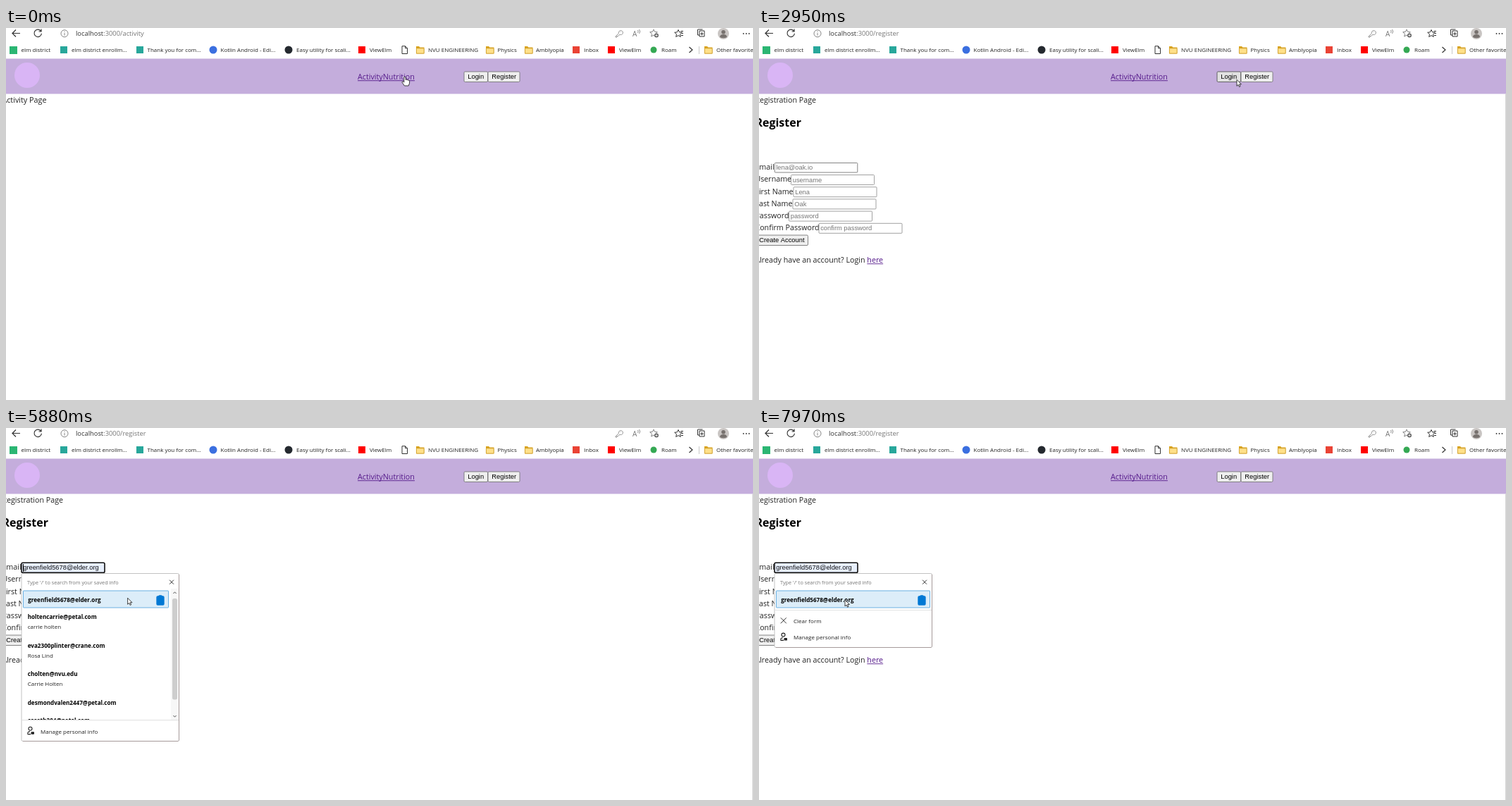
Write an HTML page with a canvas that moves like this. It is 1060 px wide and 528 px high and loops after 8 s.

```html
<!DOCTYPE html>
<html lang="en">
<head>
<meta charset="utf-8">
<title>Page navigation</title>
<style>
html, body { margin: 0; width: 100%; height: 100%; overflow: hidden; background: #fff; }
canvas { display: block; width: 1060px; height: 528px; }
</style>
</head>
<body>
<canvas id="stage" width="1060" height="528"></canvas>
<script>
const c = document.getElementById('stage').getContext('2d');
const LOOP = 8000, LEFT = -5.6;
const UI = '"Open Sans", "Noto Sans", sans-serif';
const FORM = '"Liberation Sans", sans-serif';
const PURPLE = '#551a8b';
const EMAIL = 'greenfield5678@elder.org';

// ---- drawing helpers ----
function text(s, x, y, size, color = '#222', font = UI, weight = 400) {
  c.font = `${weight} ${size}px ${font}`;
  c.fillStyle = color;
  c.fillText(s, x, y);
  return c.measureText(s).width;
}
function rect(x, y, w, h, color) {
  c.fillStyle = color;
  c.fillRect(x, y, w, h);
}
function box(x, y, w, h, r, fill, stroke, width = 1) {
  c.beginPath();
  c.roundRect(x, y, w, h, r);
  if (fill) { c.fillStyle = fill; c.fill(); }
  if (stroke) { c.strokeStyle = stroke; c.lineWidth = width; c.stroke(); }
}
function disc(x, y, r, color) {
  c.beginPath();
  c.arc(x, y, r, 0, 7);
  c.fillStyle = color;
  c.fill();
}
function line(d, color = '#333', width = 1) {
  c.strokeStyle = color;
  c.lineWidth = width;
  c.stroke(new Path2D(d));
}
function shape(d, color) {
  c.fillStyle = color;
  c.fill(new Path2D(d));
}
function link(s, x, y) {
  const w = text(s, x, y, 10.75, PURPLE);
  rect(x, y + 1.3, w, 0.9, PURPLE);
}
function button(s, x, y, w, h, hover) {
  box(x + .5, y + .5, w - 1, h - 1, 1.5, hover ? '#e2e2e2' : '#efefef', hover ? '#555' : '#767676', .9);
  text(s, x + 5.8, y + 10.4, 9.33, '#000', FORM);
}

// ---- browser frame ----
function folder(x) {
  shape(`M${x} 26h4l1.5 1.6h6v9h-11.5z`, '#d9a21b');
  box(x + .4, 28.8, 10.7, 7.2, .8, '#ffe08a', '#c9982a', .7);
}
function toolbar(path) {
  line('M20 7.5H9M14 2.5L9 7.5L14 12.5', '#333', 1.2);
  line('M49.3 4.2A5.2 5.2 0 1 0 50.4 7.8M50 1.5V5H46.5', '#333', 1.2);
  line('M88 7.8A5 5 0 1 1 78 7.8A5 5 0 1 1 88 7.8M83 7V10.6M83 4.7V5.8', '#777', .9);
  const w = text('localhost', 99, 11, 9.35, '#333');
  text(':3000' + path, 99 + w, 11, 9.35, '#767676');

  line('M869.5 7.5L865 12V13H867V11.5H868.5L871 9.3A3 3 0 1 0 869.5 7.5M872 5.5V6', '#888', .9);
  text('A', 889, 12, 10, '#777');
  line('M896.5 3Q898 5 896.5 7M898.5 2Q901 5 898.5 8', '#777', .8);
  const star = 'l1.6 3.4 3.7.4-2.8 2.5.8 3.7-3.3-1.9-3.3 1.9.8-3.7-2.8-2.5 3.7-.4z';
  line('M919 2' + star, '#777', .9);
  disc(923, 10.5, 3, '#666');
  line('M921.3 10.5h3.4M923 8.8v3.4', '#fff', .8);
  line('M954 2.5' + star + 'M957.5 4.5h3.5M958.5 7.5h2.5M958 10.5h3', '#333', 1);
  line('M984 4h7v8h-7zM982 2h6.5M981.5 2v8h2.5M987.5 6v4.4M985.3 8.2h4.4', '#333', 1);
  disc(1018, 8, 8, '#c9c5c3');
  disc(1018, 5.7, 2.8, '#77716e');
  shape('M1013 13Q1013 9 1018 9T1023 13Q1018 15.5 1013 13Z', '#77716e');
  [1046.5, 1050.5, 1054.5].forEach(x => disc(x, 8, .9, '#333'));
}
function bookmarks() {
  rect(5, 26, 11, 11, '#2bb673');
  rect(77, 26, 10, 10, '#28a79b');
  rect(185, 26, 10, 10, '#28a79b');
  disc(294, 31, 5.5, '#3b6fe0');
  disc(401, 31, 5.5, '#24292f');
  rect(500, 26, 10, 10, '#f00');
  line('M562 25.7h4.5l3 3V36.5H562zM566.5 25.7v3h3', '#333', 1);
  [582, 681, 736, 991].forEach(folder);
  rect(804, 26, 10, 10, '#ea4335');
  rect(854, 26, 10, 10, '#f00');
  disc(919, 31, 4.5, '#34a853');
  const labels = [
    ['elm district', 21.5], ['elm district enrollm...', 93], ['Thank you for com...', 200.5],
    ['Kotlin Android - Edi...', 304.5], ['Easy utility for scali...', 412], ['ViewElm', 516],
    ['NVU ENGINEERING', 599], ['Physics', 697.5], ['Amblyopia', 752], ['Inbox', 820],
    ['ViewElm', 870], ['Roam', 930], ['Other favorite', 1008]
  ];
  for (const [s, x] of labels) text(s, x, 34, 8);
  line('M969.5 27L974 31L969.5 35', '#333', 1.2);
  line('M983.5 26V37', '#c8c8c8', 1);
}
function navbar(cur) {
  rect(0, 43.5, 1060, 50, '#c4addc');
  disc(30, 67, 18, '#d9b5f5');
  link('ActivityNutrition', 499, 73);
  const hover = (a, b) => inside(cur, a, b, 62, 77);
  button('Login', 649.5, 61.5, 34.5, 15.5, hover(650, 683));
  button('Register', 683.5, 61.5, 46, 15.5, hover(684, 729));
}

// ---- pages ----
function band() {
  const pale = '#e6f2f7', aqua = '#cbe8ee', grey = '#cbcbcb';
  shape('M205 140Q226 134 239 153Q263 186 261 244L265 264Q230 268 197 257Q203 225 198 205L200 178L209 165Z', pale);
  shape('M211 152Q230 146 243 167Q259 198 257 240Q228 246 206 214Q200 184 211 152Z', aqua);
  shape('M200 248Q235 259 264 246L262 280L192 268Z', pale);
  shape('M196 290L257 304Q249 338 220 366L210 362Q231 335 236 316Q216 304 196 290Z', pale);
  shape('M240 305L257 304Q249 338 222 364Q238 335 240 305Z', aqua);
  shape('M187 264L264 279L259 304L180 286Z', pale);
  shape('M183 275L262 292L259 304L180 286Z', aqua);
  shape('M62 262L133 289Q118 312 125 345Q131 386 158 400Q178 409 201 396L186 409Q158 412 129 405Q92 394 72 350Q51 310 62 262Z', pale);
  shape('M65 278Q95 280 121 298Q116 330 124 358Q132 390 156 404Q134 405 116 397Q90 385 76 352Q57 312 65 278Z', aqua);
  shape('M92 361L109 367L111 371L95 367ZM97 375L117 381L120 386L102 382Z', pale);
  shape('M152 344L214 360L210 373L147 360Z', pale);
  shape('M151 342L158 347L149 364L137 376L146 354ZM170 344L194 349L191 358L167 353ZM168 361L189 365L183 378L165 373Z', grey);
  shape('M209 362L220 362Q221 381 208 392L187 410L180 407Q204 394 209 362Z', grey);
  line('M153 383L168 386', '#ddd', 1);
  shape('M148 132Q169 130 203 142Q210 150 208 165Q168 220 133 288L63 263Q88 201 132 147Q140 136 148 132Z', grey);
  line('M147 127L201 142', '#c4c4c4', .8);
  line('M203 151Q165 207 136 275', '#dedede', 1);
}
function home() {
  band();
  text('Zest Journal', LEFT, 481, 21.3, '#000', UI, 700);
  text('Helping you take back control of your world', LEFT, 519, 16, '#000', UI, 700);
}
function field(x, y, hint) {
  box(x, y, 118, 14, 1, '#fff', '#8a8a8a', .8);
  text(hint, x + 2.2, y + 10, 9.33, '#757575', FORM);
}
function register(t) {
  text('Registration Page', LEFT, 106, 10.7);
  text('Register', LEFT, 140, 16, '#000', UI, 700);
  const rows = [['Email'], ['Username', 45.5, 'username'], ['First Name', 49, 'Lena'],
    ['Last Name', 48, 'Oak'], ['Password', 42.5, 'password'], ['Confirm Password', 85, 'confirm password']];
  rows.forEach(([label, x, hint], i) => {
    text(label, LEFT, 201.2 + i * 17.2, 10.7);
    if (hint) field(x, 191.3 + i * 17.2, hint);
  });
  button('Create Account', LEFT, 293.5, 75.6, 15.5);
  const s = 'Already have an account? Login ';
  link('here', LEFT + text(s, LEFT, 333, 10.7), 333);

  const filled = t >= 4350, focused = t >= 3750;
  const fill = filled ? '#e8f0fe' : '#fff';
  if (focused) box(22, 191.3, 118, 14, 1.8, fill, '#101010', 1.6);
  else box(22.3, 191.5, 117.5, 13.5, 1, fill, '#767676', .9);
  const w = text(filled ? EMAIL : 'lena@oak.io', 24.2, 201, 9.33, filled ? '#111' : '#757575', FORM);
  if (caretOn(t)) rect(t < 6430 ? 24 : 24.4 + w, 193, 1, 11, '#000');
}
function caretOn(t) {
  if (t < 3750) return false;
  if (t < 6430) return Math.floor((t - 3750) / 530) % 2 === 0;
  return t < 7000 || (t >= 7440 && t < 7900);
}

// ---- saved info popup ----
function cross(x, y, r) {
  line(`M${x - r} ${y - r}L${x + r} ${y + r}M${x + r} ${y - r}L${x - r} ${y + r}`, '#333', 1);
}
function clipboard(x, on) {
  const color = on ? '#0078d4' : '#222';
  box(x - 5, 239, 10, 12, 1.2, on ? color : '#fff', color, 1.3);
  box(x - 2.5, 237.8, 5, 2.4, 1, on ? color : '#fff', color, 1);
}
function manage(y) {
  c.beginPath();
  c.arc(34.5, y - 6.8, 2.5, 0, 7);
  c.strokeStyle = '#222';
  c.lineWidth = 1.1;
  c.stroke();
  line(`M35 ${y + 1}H31Q30 ${y - 2.7} 34 ${y - 2.7}`, '#222', 1.1);
  box(35.5, y - 2.3, 4.5, 3.4, .6, '#222');
  text('Manage personal info', 49, y, 8);
}
function popup(short, hover, alpha) {
  const h = short ? 105 : 238, bold = (s, x, y) => text(s, x, y, 8.15, '#000', UI, 700);
  c.save();
  c.globalAlpha = alpha;
  if (alpha < 1) {
    c.translate(134, 206.5 + h / 2);
    c.scale(.991, .991);
    c.translate(-134, -206.5 - h / 2);
  }
  box(22, 206.5, 223.5, h, 2, '#fff', '#bcbcbc', .9);
  line(`M245.5 208V${205.5 + h}M24 ${206.5 + h}H244.5`, '#a39696', .9);
  text("Type '/' to search from your saved info", 30, 221.5, 7.3, '#767676');
  cross(235, 218.7, 3);
  if (hover) box(24.5, 231, short ? 218 : 206, 24, .5, '#dcedf9', '#6ab0e2', 1);
  clipboard(short ? 231 : 219, hover);
  bold(EMAIL, 31.2, 247.2);
  if (short) {
    line('M22 258.5H245', '#e2e2e2', 1);
    cross(34.8, 273.3, 4);
    text('Clear form', 49, 276.7, 8);
    manage(300.4);
  } else {
    rect(234, 228, 11, 186, '#f7f7f7');
    box(236, 242, 7, 143.5, 2.5, '#cdcdcd');
    line('M237.4 235L239.5 232.8L241.6 235M237.4 408L239.5 410.2L241.6 408', '#555', 1);
    bold('holtencarrie@petal.com', 30.7, 271.3);
    text('carrie holten', 30.7, 285.3, 8);
    bold('eva2300plinter@crane.com', 30.7, 311.8);
    text('Rosa Lind', 30.7, 325.7, 8);
    bold('cholten@nvu.edu', 30.7, 352.4);
    text('Carrie Holten', 30.7, 366.4, 8);
    bold('desmondvalen2447@petal.com', 30.7, 392.6);
    c.save();
    c.beginPath();
    c.rect(23, 400, 210, 14.3);
    c.clip();
    bold('caseth204@petal.com', 30.7, 418.4);
    c.restore();
    line('M22 414.7H245', '#dedede', 1);
    manage(433.6);
  }
  c.restore();
}

// ---- pointer ----
// start, end, steps, target x, target y, lift, lead (0: the first step is the click)
const moves = [
  [250, 1210, 8, 30, 62, 0, 0],
  [1640, 2420, 7, 714, 66, -6, 1],
  [2700, 3600, 8, 64, 199, 0, 0],
  [4050, 4350, 3, 161, 234, 0, 1],
  [5340, 5470, 2, 177, 242, 0, 1],
  [5750, 6430, 6, 118, 232, 0, 1],
  [6720, 6720, 1, 112, 203, 0, 1],
  [6870, 7140, 3, 97, 200, 0, 1],
  [7440, 7970, 5, 122, 244, 0, 0]
];
function pointer(t) {
  let x = 566, y = 69;
  for (const [t0, t1, n, tx, ty, lift, lead] of moves) {
    if (t < t0) break;
    const i = n > 1 ? Math.min(n - 1, Math.floor((t - t0) / (t1 - t0) * (n - 1) + 1e-6)) : 0;
    const p = (i + lead) / (n - 1 + lead), e = p * p * (3 - 2 * p);
    x += (tx - x) * e;
    y += (ty - y) * e + lift * Math.sin(Math.PI * p);
  }
  return { x, y };
}
function inside(p, x0, x1, y0, y1) {
  return p.x >= x0 && p.x <= x1 && p.y >= y0 && p.y <= y1;
}
function drawPointer(p, onForm) {
  c.save();
  c.translate(p.x, p.y);
  c.lineJoin = 'round';
  let d = 'M0 0V9L2.1 7.1L3.5 10.2L5 9.5L3.6 6.5H6.4Z';
  if (inside(p, 499, 580, 62, 77) || inside(p, 8, 51, 50, 84))
    d = 'M-1.2 .8Q0-.8 1.1 .8V4.4Q2.4 3.6 3.2 4.8Q4.4 4.2 5.1 5.4Q6.4 5 6.6 6.4V9.2L5.2 13H-.6L-3.9 8.2Q-4 6.3-2.3 7L-1.2 8.1Z';
  else if (onForm && inside(p, 22, 140, 191, 206)) d = '';
  if (d) {
    shape(d, '#fff');
    line(d, '#111', .8);
  } else {
    line('M-2-5Q0-5 0-4Q0-5 2-5M0-4V4M-2 5Q0 5 0 4Q0 5 2 5', '#111', .9);
  }
  c.restore();
}

function draw(t) {
  const page = t < 250 ? 'activity' : t < 1360 ? 'nutrition' : t < 2700 ? '' : 'register';
  const cur = pointer(t);
  rect(0, 0, 1060, 528, '#fff');
  toolbar(page && '/' + page);
  bookmarks();
  navbar(cur);
  if (page === 'activity') text('Activity Page', LEFT, 106, 10.8);
  else if (page === 'nutrition') text('Nutrition Page', LEFT, 106, 10.7);
  else if (page === 'register') register(t);
  else home();
  rect(1059, 93.5, 1, 435, '#d4d4d4');

  const row = inside(cur, 24, 231, 231, 255);
  if (t >= 3750 && t < 6720) popup(false, row, t < 6570 ? 1 : .87);
  if (t >= 7440) popup(true, row, t < 7570 ? .6 : 1);
  drawPointer(cur, page === 'register');
}
function tick() {
  draw(performance.now() % LOOP);
  requestAnimationFrame(tick);
}
tick();
</script>
</body>
</html>
```
